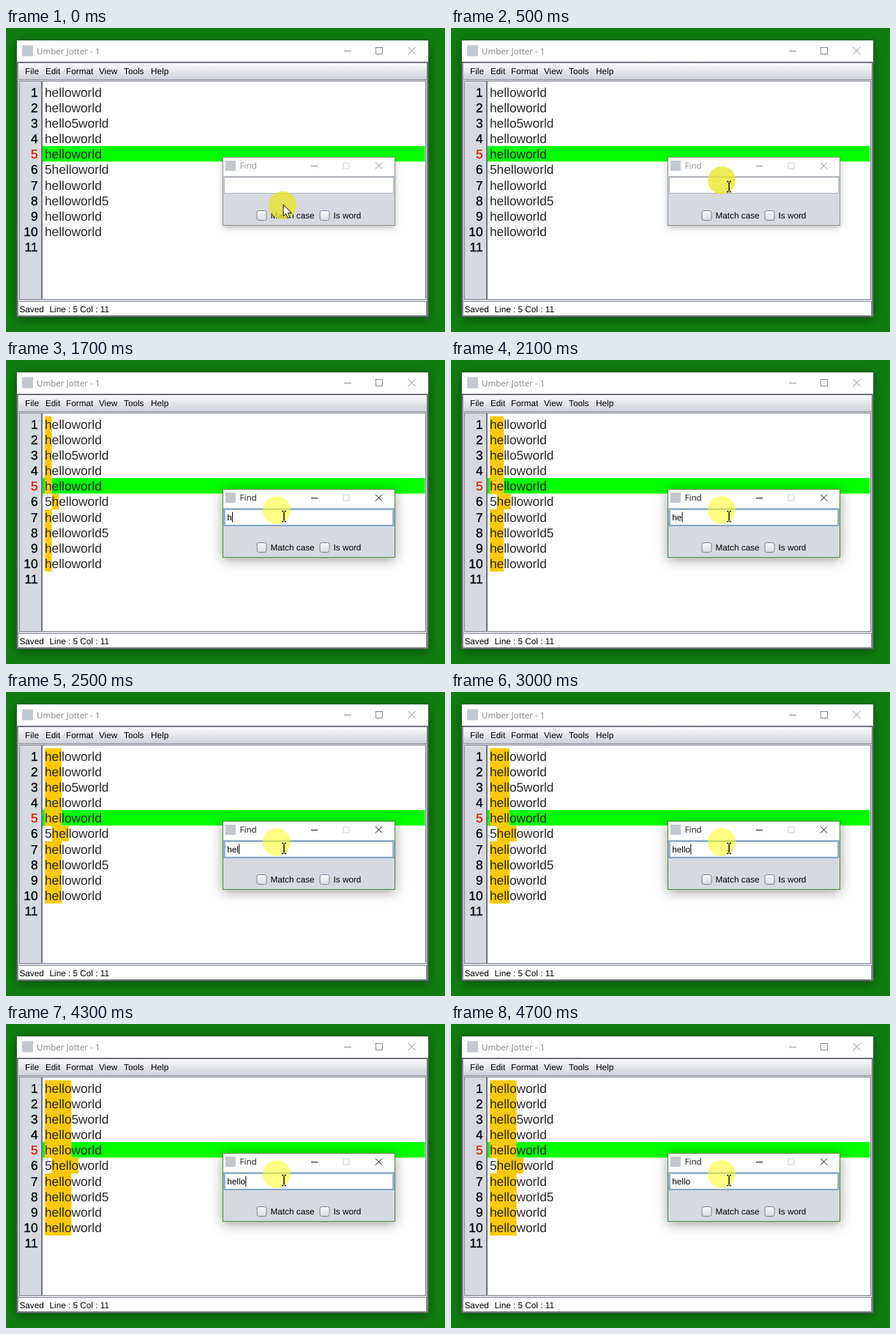
An HTML page with a canvas for the animation above (5000 ms loop, 600 by 415 pixels).

```html
<!DOCTYPE html>
<html lang="en">
<head>
<meta charset="utf-8">
<title>Find while typing</title>
<style>
html, body { margin: 0; width: 100%; height: 100%; overflow: hidden; background: #107c10; }
canvas { display: block; }
</style>
</head>
<body>
<canvas id="stage" width="600" height="415"></canvas>
<script>
const ctx = document.getElementById('stage').getContext('2d');
ctx.textRendering = 'geometricPrecision';

const LOOP = 5000, STEP = 100;
const ACTIVATE = 800, RELEASED = 1200;
const QUERY = 'hello';
const KEY_TIMES = [1600, 2000, 2300, 2600, 3000];
const LINES = ['helloworld', 'helloworld', 'hello5world', 'helloworld', 'helloworld',
  '5helloworld', 'helloworld', 'helloworld5', 'helloworld', 'helloworld', ''];
const CURRENT = 4;
const ROW_TOP = 76.8, ROW_HEIGHT = 21.17, TEXT_X = 53;

const SANS = '"Liberation Sans", Arial, sans-serif';
const UI = '11.75px ' + SANS;
const CODE = '17.3px ' + SANS;
const TITLE = '11.6px "Open Sans", sans-serif';
const PANEL = '#d6d9df';

function rect(x, y, w, h, color) {
  ctx.fillStyle = color;
  ctx.fillRect(x, y, w, h);
}

function frame(x, y, w, h, color, width = 1) {
  ctx.strokeStyle = color;
  ctx.lineWidth = width;
  ctx.strokeRect(x + width / 2, y + width / 2, w - width, h - width);
}

function text(str, x, y, font, color = '#000', align = 'left') {
  ctx.font = font;
  ctx.fillStyle = color;
  ctx.textAlign = align;
  ctx.fillText(str, x, y);
}

function segments(points, color, width = 1) {
  ctx.strokeStyle = color;
  ctx.lineWidth = width;
  ctx.beginPath();
  for (const [x1, y1, x2, y2] of points) {
    ctx.moveTo(x1, y1);
    ctx.lineTo(x2, y2);
  }
  ctx.stroke();
}

function circle(x, y, r) {
  ctx.beginPath();
  ctx.arc(x, y, r, 0, Math.PI * 2);
}

function vertical(y1, y2, from, to) {
  const g = ctx.createLinearGradient(0, y1, 0, y2);
  g.addColorStop(0, from);
  g.addColorStop(1, to);
  return g;
}

function shadowed(x, y, w, h, blur, alpha) {
  ctx.save();
  ctx.shadowColor = `rgba(0,0,0,${alpha})`;
  ctx.shadowBlur = blur;
  ctx.shadowOffsetY = 3;
  rect(x, y, w, h, '#fff');
  ctx.restore();
}

function windowButtons(minX, maxX, closeX, y, size, color, maxColor) {
  const h = size / 2;
  segments([[minX - h, y + 0.5, minX + h, y + 0.5]], color);
  frame(maxX - h, y - h, size, size, maxColor);
  segments([[closeX - h, y - h, closeX + h, y + h], [closeX - h, y + h, closeX + h, y - h]], color);
}

function drawEditor(found) {
  shadowed(15, 17, 562, 377, 14, 0.4);
  frame(14, 16, 564, 379, 'rgba(70,100,70,.7)');
  rect(22, 23.5, 15, 15, '#c3c8cf');
  text('Umber Jotter - 1', 42, 35.8, TITLE, '#858585');
  windowButtons(467, 510, 554.5, 31, 10, '#8c8c8c', '#8c8c8c');

  rect(15, 46, 562, 348, PANEL);
  rect(15, 46, 562, 2, '#6f737a');
  rect(15, 46, 1.5, 348, '#777b82');
  rect(575, 46, 2, 348, '#777b82');
  rect(17, 48, 558, 22, vertical(48, 70, '#fafafc', '#cfd2d9'));
  rect(17, 70, 558, 1, '#8a8e96');
  [['File', 26], ['Edit', 54], ['Format', 82], ['View', 127], ['Tools', 161], ['Help', 198]]
    .forEach(([label, x]) => text(label, x, 63.4, UI));

  rect(18, 72, 556, 299, '#fff');
  frame(18, 72, 556, 299, '#858992');
  rect(19, 73, 29, 297, PANEL);
  rect(48, 73, 2, 297, '#70747c');
  rect(50, ROW_TOP + CURRENT * ROW_HEIGHT - 0.3, 522.5, ROW_HEIGHT, '#0f0');

  LINES.forEach((line, i) => {
    const top = ROW_TOP + i * ROW_HEIGHT;
    const base = top + 16.7;
    const at = found ? line.indexOf(found) : -1;
    ctx.font = CODE;
    ctx.textAlign = 'left';
    if (at >= 0) {
      const x = TEXT_X + ctx.measureText(line.slice(0, at)).width;
      rect(x, top, ctx.measureText(found).width, ROW_HEIGHT + 0.2, '#ffc800');
    }
    const ink = i === CURRENT ? '#d81800' : '#000';
    text(String(i + 1), 43.5, base, CODE, ink, 'right');
    ctx.strokeStyle = ink;
    ctx.lineWidth = 0.3;
    ctx.strokeText(String(i + 1), 43.5, base);
    text(line, TEXT_X, base, CODE, '#292929');
  });

  rect(16, 374, 559, 19, '#fff');
  frame(16, 373, 559, 20, '#92969e');
  rect(15, 393, 562, 1, '#6f737a');
  text('Saved', 18.5, 387.5, UI);
  text('Line : 5 Col : 11', 59.5, 387.5, UI);
}

function checkbox(x, label, labelX) {
  ctx.beginPath();
  ctx.roundRect(x + 0.5, 249.5, 13, 13, 2.5);
  ctx.fillStyle = vertical(250, 263, '#fbfbfc', '#d5d8de');
  ctx.fill();
  ctx.strokeStyle = '#7d828b';
  ctx.lineWidth = 1;
  ctx.stroke();
  text(label, labelX, 260.4, UI);
}

function drawFind(active, typed, caret) {
  const ink = active ? '#111' : '#8f8f8f';
  shadowed(296, 176, 236, 94, active ? 15 : 8, active ? 0.38 : 0.25);
  rect(297, 202, 234, 67, PANEL);
  frame(296, 176, 236, 94, active ? '#4f8a3c' : '#8d9690');
  rect(300, 181, 14, 14, '#c3c8cf');
  text('Find', 319.5, 192, TITLE, ink);
  windowButtons(421.5, 465, 509.5, 188, 9, ink, '#d0d0d0');

  rect(298, 203, 232, 23, '#fff');
  if (active) {
    frame(297.5, 202.5, 233, 24.5, '#7ea6c9', 2);
    frame(299, 204, 230, 21.5, '#a8b4c0', 0.7);
  } else {
    frame(298, 203, 232, 23, '#b0b4bb');
    rect(298, 203, 232, 1, '#858991');
  }
  text(typed, 302.3, 218.7, UI);
  if (caret) {
    rect(302.5 + ctx.measureText(typed).width, 207.5, 1, 14, '#000');
  }
  checkbox(342.5, 'Match case', 361.5);
  checkbox(428.5, 'Is word', 447.5);
}

function drawArrow(x, y) {
  const shape = [[0, 0], [0, 16], [3.7, 12.6], [6.3, 18.3], [8.8, 17.2], [6.3, 11.7], [11.2, 11.4]];
  ctx.beginPath();
  shape.forEach(([dx, dy]) => ctx.lineTo(x + dx, y + dy));
  ctx.closePath();
  ctx.fillStyle = '#fff';
  ctx.fill();
  ctx.strokeStyle = '#111';
  ctx.lineWidth = 1;
  ctx.stroke();
}

function drawBeam(x, y) {
  segments([
    [x, y - 6, x, y + 6],
    [x - 3, y - 7, x - 0.7, y - 7], [x + 0.7, y - 7, x + 3, y - 7],
    [x - 3, y + 7, x - 0.7, y + 7], [x + 0.7, y + 7, x + 3, y + 7]
  ], '#111', 1.5);
}

function drawPointer(t) {
  const p = Math.min(1, Math.max(0, (t - 100) / 500));
  const ease = p * p * (3 - 2 * p);
  const x = 379, y = 241 - 28 * ease;
  const overField = y < 227;
  const release = Math.min(1, Math.max(0, (t - ACTIVATE) / (RELEASED - ACTIVATE)));

  // The halo brightens and thins out as the click is released.
  const tone = 232 + 23 * release;
  circle(overField ? x - 9 : x - 1, overField ? y - 8 : y + 1, 19);
  ctx.fillStyle = `rgba(${tone},${tone - 2},40,${0.78 - 0.2 * release})`;
  ctx.fill();

  if (t >= ACTIVATE && t < RELEASED) {
    for (const r of [24 * release + 4, 24 * release - 8]) {
      if (r <= 0) continue;
      circle(x - 2, y - 0.5, r);
      ctx.strokeStyle = `rgba(160,180,95,${1 - 0.75 * release})`;
      ctx.lineWidth = 2;
      ctx.stroke();
    }
  }
  if (overField) drawBeam(x + 1, y + 0.5);
  else drawArrow(x, y);
}

function draw(now) {
  const t = Math.floor(now % LOOP / STEP) * STEP;
  const typedAt = time => QUERY.slice(0, KEY_TIMES.filter(k => k <= time).length);
  const active = t >= ACTIVATE;
  const lastInput = Math.max(ACTIVATE, ...KEY_TIMES.filter(k => k <= t));
  const caret = active && Math.floor((t - lastInput) / 500) % 2 === 0;

  rect(0, 0, 600, 415, '#107c10');
  drawEditor(typedAt(t - STEP));
  drawFind(active, typedAt(t), caret);
  drawPointer(t);
}

const start = performance.now();
function tick() {
  draw(performance.now() - start);
  requestAnimationFrame(tick);
}
tick();
</script>
</body>
</html>
```
